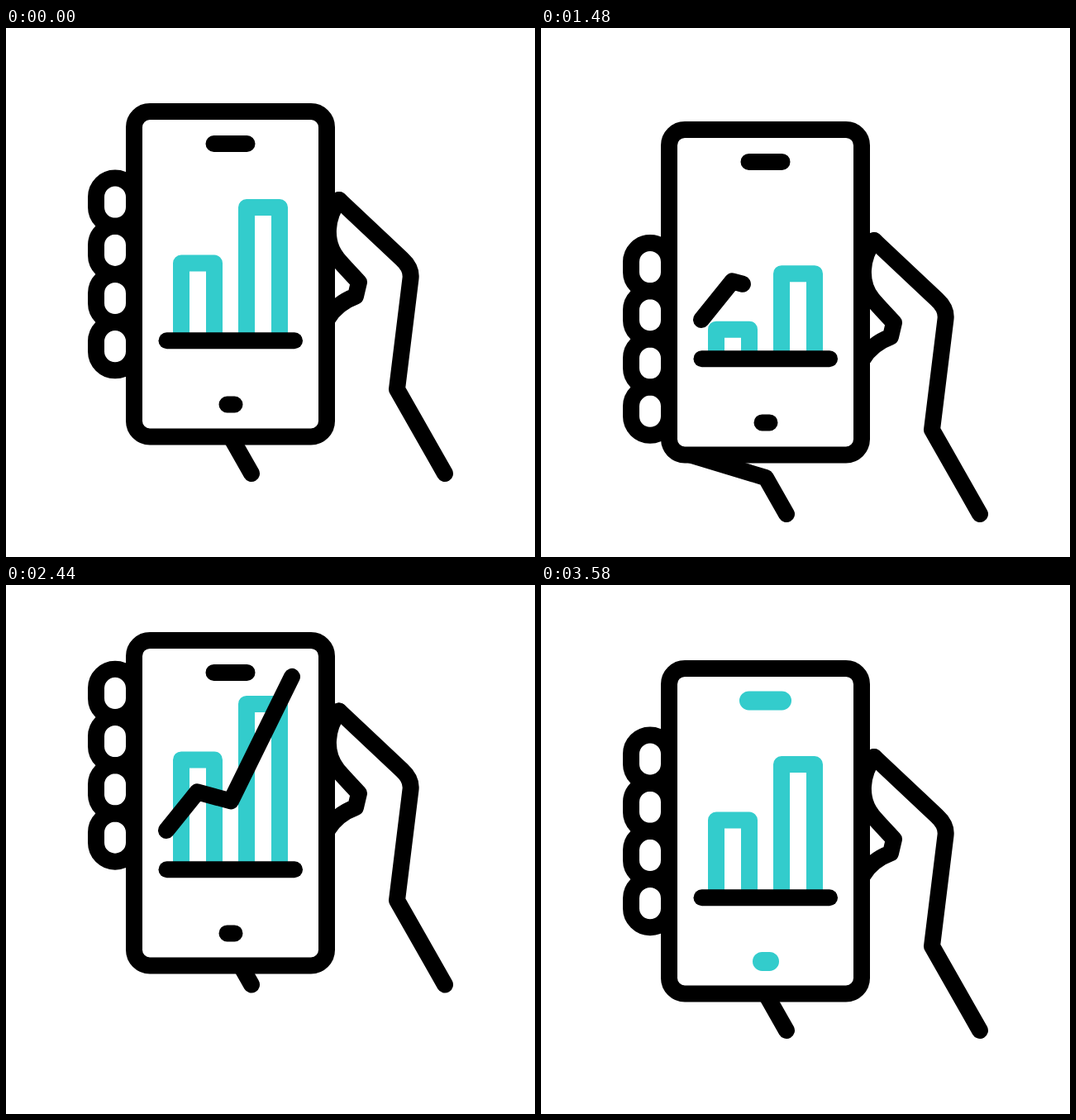
Recreate the animation shown at these times as an HTML page. Size 640 by 640 pixels, loop 3.6 s.

```html
<!DOCTYPE html>
<html lang="en">
<head>
<meta charset="utf-8">
<title>Phone chart</title>
<style>
  html, body { margin: 0; width: 100%; height: 100%; overflow: hidden; background: #fff; }
  svg { display: block; width: 100vw; height: 100vh; }
  .ink { fill: none; stroke: #000; stroke-width: 20; stroke-linecap: round; stroke-linejoin: round; }
  .teal { stroke: #3cc; }
</style>
</head>
<body>
<svg viewBox="0 0 640 640">
  <defs>
    <clipPath id="above"><rect x="160" y="0" width="220" height="378"/></clipPath>
  </defs>
  <g id="hand" class="ink">
    <path d="M160 461 L272 495 L297 539"/>
    <path d="M403 208 L479 279.5 Q491 290.500 489.500 303 L473 437 L531 539"/>
    <path d="M403 208 C388 228 384 258 401 279 Q404 283 427 307.500 L423 324.500 Q400 333 389 352"/>
  </g>
  <g id="fingers" class="ink"></g>
  <g id="phone" class="ink">
    <rect x="155" y="101" width="233" height="393.500" rx="19" fill="#fff"/>
    <path id="pills" d="M251.500 140 H291.500 M267.500 455.500 H276.500"/>
    <g clip-path="url(#above)">
      <path id="bars" class="teal" d="M212 480 V284.500 H252 V480 M291 480 V217 H331 V480"/>
    </g>
    <path d="M194.500 378.300 H349"/>
    <path id="trend" d="M194 331 L231.500 284.500 L272 295.500 L346 145"/>
    <g id="sparks" class="teal"></g>
  </g>
</svg>
<script>
const LOOP = 3600, STEP = 20;
const $ = id => document.getElementById(id);
const NS = 'http://www.w3.org/2000/svg';

function add(parent, tag, attrs) {
  const el = document.createElementNS(NS, tag);
  for (const k in attrs) el.setAttribute(k, attrs[k]);
  return parent.appendChild(el);
}

for (let i = 0; i < 4; i++)
  add($('fingers'), 'rect', { x: 109, y: 181.5 + i * 58.2, width: 46, height: 58.2, rx: 23 });

// Each spark: inner point, then outward vector
const sparks = [[328, 116, -5, -7], [362.5, 113, 4, -7.5], [382, 142, 8, 0]]
  .map(v => ({ v, el: add($('sparks'), 'path', {}) }));

// Eased keyframes [time, value, optional starting slope]
function track(keys, t) {
  if (t <= keys[0][0]) return keys[0][1];
  for (let i = 1; i < keys.length; i++) {
    const [t0, a, slope = 0] = keys[i - 1], [t1, b] = keys[i];
    if (t < t1) {
      const s = (t - t0) / (t1 - t0);
      const f = s * s * (3 - 2 * s) + slope * s * (1 - s) * (1 - s);
      return a + (b - a) * f;
    }
  }
  return keys[keys.length - 1][1];
}

const sway = (low, high, slope) => [[0, 0], [1610, low], [2270, high, slope], [LOOP, 0]];
const phoneY = sway(22.3, -39, 0.83);
const handY = sway(50, -62.7, 0.72);
const fingersY = sway(80, -89.5, 0.67);
const barsY = [[0, 0], [435, 61], [870, 39], [1610, 60], [2270, -43.5, 0.6], [LOOP, 0]];
const trendEnd = [[0, 0], [870, 158], [1550, 70], [2470, 270.3]];
const trendStart = [[2450, 0], [3255, 270.3]];
const sparkHead = [[2450, 0], [2620, 1]];
const sparkTail = [[2780, 0], [2950, 1]];

const moveY = (id, y) => $(id).setAttribute('transform', `translate(0 ${y.toFixed(2)})`);

function draw(t) {
  moveY('phone', track(phoneY, t));
  moveY('hand', track(handY, t));
  moveY('fingers', track(fingersY, t));
  moveY('bars', track(barsY, t));

  const from = track(trendStart, t), len = track(trendEnd, t) - from;
  const trend = $('trend').style;
  trend.display = len > 0.5 ? '' : 'none';
  trend.strokeDasharray = `${Math.max(len, 0)} 999`;
  trend.strokeDashoffset = -from;

  const head = track(sparkHead, t), tail = track(sparkTail, t);
  $('sparks').style.display = head > tail ? '' : 'none';
  for (const { v: [x, y, dx, dy], el } of sparks)
    el.setAttribute('d', `M${x + dx * tail} ${y + dy * tail} L${x + dx * head} ${y + dy * head}`);

  const lit = t % 720 >= 600;
  $('pills').style.stroke = lit ? '#3cc' : '#000';
  $('pills').style.strokeWidth = lit ? 23 : 20;
}

const begin = performance.now();
function tick() {
  const t = (performance.now() - begin) % LOOP;
  draw(Math.floor(t / STEP) * STEP);
  requestAnimationFrame(tick);
}
tick();
</script>
</body>
</html>
```
